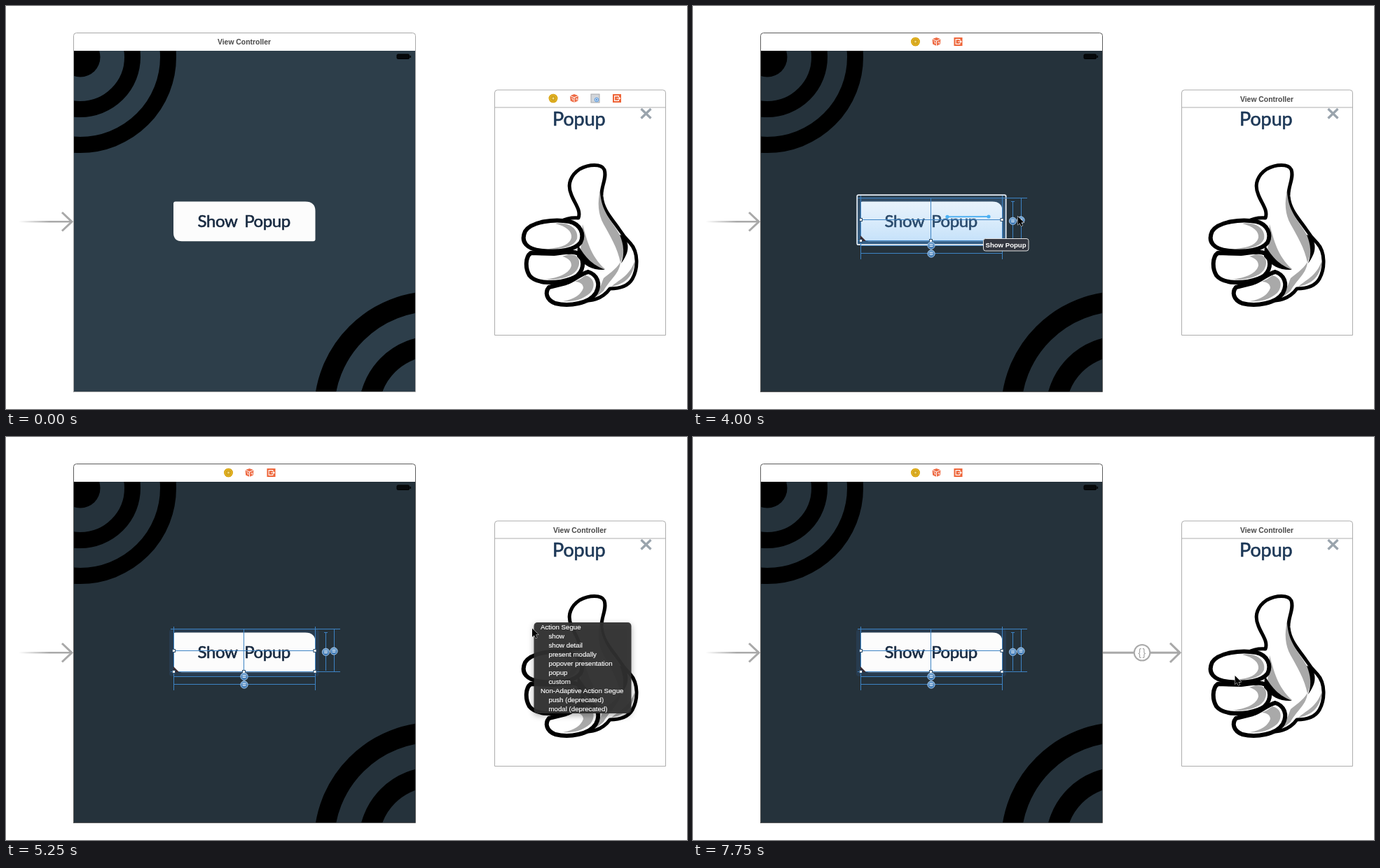
These frames come from a looping animation (972 px wide and 576 px high, 8000 ms). An HTML page:

```html
<!DOCTYPE html>
<html lang="en">
<head>
<meta charset="utf-8">
<title>Storyboard popup segue</title>
<style>
html, body { margin: 0; width: 100%; height: 100%; overflow: hidden; background: #fff; }
svg { display: block; width: 972px; height: 576px; font-family: "Liberation Sans", Arial, sans-serif; }
.title { font-weight: bold; font-size: 10.4px; fill: #484848; text-anchor: middle; }
.hand { font-family: Lato, sans-serif; stroke-width: .6; stroke-linejoin: round; }
.tip { font-weight: bold; font-size: 9.6px; fill: #fff; }
.ink { fill: #fff; stroke: #000; stroke-width: 5; stroke-linejoin: round; }
.finger { stroke-width: 6; }
.shade { fill: #a9a9a9; }
.guide { fill: none; stroke: #3d83c4; stroke-width: 1; }
.arrow { fill: none; stroke: #a9a9a9; stroke-width: 3; }
#menu text { font-size: 9.7px; fill: #fff; stroke: #fff; stroke-width: .15; }
#menu text.on { font-weight: bold; font-size: 9.3px; stroke: none; }
</style>
</head>
<body>
<svg viewBox="0 0 972 576">
  <defs>
    <clipPath id="screen"><rect x="96" y="64" width="488" height="488"/></clipPath>
    <linearGradient id="fadeIn" gradientUnits="userSpaceOnUse" x1="18" y1="0" x2="92" y2="0">
      <stop offset="0" stop-color="#a9a9a9" stop-opacity="0"/>
      <stop offset=".6" stop-color="#a9a9a9"/>
    </linearGradient>
    <linearGradient id="tint" x1="0" y1="0" x2="0" y2="1">
      <stop offset="0" stop-color="#7cc0fa" stop-opacity=".12"/>
      <stop offset="1" stop-color="#4ba6f5" stop-opacity=".33"/>
    </linearGradient>
    <linearGradient id="bead" x1="0" y1="0" x2="0" y2="1">
      <stop offset="0" stop-color="#79a9d6"/>
      <stop offset="1" stop-color="#2f6cab"/>
    </linearGradient>
    <filter id="shadow" x="-20%" y="-20%" width="140%" height="140%">
      <feDropShadow dx="0" dy="3" stdDeviation="4" flood-opacity=".35"/>
    </filter>
    <g id="rings" fill="none" stroke="#000" stroke-width="23">
      <circle r="28.5" fill="#000" stroke="none"/>
      <circle r="74.5"/>
      <circle r="125.5"/>
    </g>
    <g id="owner">
      <circle r="6.3" fill="#f0c22e"/>
      <circle r="5.7" fill="none" stroke="#d3a016" stroke-width="1.2"/>
      <circle r="3.6" fill="none" stroke="#bb8d12" stroke-width=".9"/>
      <rect x="-1.500" y="-1.800" width="3" height="3.600" fill="#fbe48c" stroke="#bb8d12" stroke-width=".8"/>
    </g>
    <g id="cube">
      <path d="M0-6 6-3.7 5.3 3.6 0 6-5.3 3.6-6-3.7Z" fill="#ee6a43"/>
      <path d="M-6-3.6 0-1.2 6-3.6M0-1.2V6" fill="none" stroke="#fff" stroke-width="1"/>
      <path d="M2 1.2 4 .3V3M-4-.3-2 .6V3" fill="none" stroke="#fff" stroke-width=".9"/>
    </g>
    <g id="exit">
      <rect x="-6" y="-6" width="12" height="12" fill="#ee6336"/>
      <path d="M2.4-1.7V-3.4H-3.4V3.4H2.4V1.7M-.6 0H4.5M3-1.5 4.6 0 3 1.5" fill="none" stroke="#fff" stroke-width="1.1"/>
    </g>
    <g id="recognizer">
      <rect x="-6" y="-6" width="12" height="12" fill="#d3d6da" stroke="#a5a8ac"/>
      <circle cx="2" cy="2" r="2.8" fill="#c5def6" stroke="#5a9be0"/>
      <circle cx="2" cy="2" r="1.1" fill="#3b7fd0"/>
    </g>
    <g id="equal">
      <circle r="5.2" fill="url(#bead)" stroke="#a9c8e6" stroke-width=".9"/>
      <path d="M-2.4-1.2H2.4M-2.4 1.3H2.4" stroke="#fff"/>
    </g>
    <rect id="grip" x="-2" y="-2" width="4" height="4" fill="#fff" stroke="#2d4a66"/>
  </defs>

  <path d="M18 308.3H92" fill="none" stroke="url(#fadeIn)" stroke-width="2.4"/>
  <path class="arrow" d="M80 295 94 308.3 80 321.5"/>

  <!-- main scene -->
  <g clip-path="url(#screen)">
    <rect id="backdrop" x="96" y="64" width="488" height="488"/>
    <use href="#rings" transform="translate(106 73)"/>
    <use href="#rings" transform="translate(611 579) scale(1.25)"/>
    <rect x="558" y="69" width="17.5" height="6.5" rx="1.5" fill="#06090b" stroke="#000"/>
    <path d="M577.3 70.8V74" stroke="#000" stroke-width="1.5"/>
  </g>
  <g id="frame" fill="none">
    <path d="M96.5 64V42.5Q96.5 38.5 100.5 38.5H580.5Q584.5 38.5 584.5 42.5V64" fill="#fff"/>
    <path d="M96.5 64V551.5H584.5V64"/>
  </g>
  <rect id="glow" x="233" y="275" width="214" height="67" rx="4" fill="#29415a" opacity=".65"/>
  <path d="M242 279.500H427Q441.500 279.500 441.500 293V333.300Q441.500 336.300 438.500 336.300H251Q239 336.300 239 324V282.500Q239 279.500 242 279.500Z" fill="#fcfcfc"/>
  <text class="hand" x="273.500" y="316" font-size="24" word-spacing="4.500" letter-spacing="-.4" fill="#182a41" stroke="#182a41">Show Popup</text>
  <text id="mainTitle" class="title" x="340" y="55.300">View Controller</text>
  <g id="mainIcons">
    <use href="#owner" x="317.500" y="51"/><use href="#cube" x="347.500" y="51"/><use href="#exit" x="378.500" y="51"/>
  </g>
  <g id="buttonTint">
    <rect x="234" y="270" width="213" height="71.500" rx="2" fill="url(#tint)"/>
    <rect x="234.200" y="270.200" width="212.500" height="71" rx="2" fill="none" stroke="#e7eef5" stroke-width="1.700"/>
  </g>
  <g id="guides">
    <path class="guide" d="M235 274.500H477M235 335.500H477M239.500 271V362M441.500 271V362M239 305.500H441M339.500 275V354M456.500 280V334M468.500 275V335M454 279.500H459M239 342.500H441M239 353.500H441"/>
    <path d="M239 328V336H247Z" fill="#3a2b30"/>
    <use href="#grip" x="239.500" y="305.500"/><use href="#grip" x="441" y="305.500"/>
    <use href="#grip" x="339.500" y="335.500"/><use href="#grip" x="239.500" y="335.500"/><use href="#grip" x="441" y="335.500"/>
    <use href="#equal" x="456.500" y="307.300"/><use href="#equal" x="468" y="306"/>
    <use href="#equal" x="340" y="342.300"/><use href="#equal" x="340" y="354"/>
  </g>

  <!-- popup scene -->
  <path d="M697.500 470.500V124Q697.500 120 701.500 120H937.500Q941.500 120 941.500 124V470.500ZM697.500 145H941.500" fill="#fff" stroke="#adadad"/>
  <text id="popTitle" class="title" x="819" y="136.600">View Controller</text>
  <g id="popIcons">
    <use href="#owner" x="781" y="132"/><use href="#cube" x="811" y="132"/>
    <use href="#recognizer" x="841" y="132"/><use href="#exit" x="872" y="132"/>
  </g>
  <text class="hand" x="780" y="170.500" font-size="27" letter-spacing="-.1" fill="#1d3857" stroke="#1d3857">Popup</text>
  <path d="M906.500 147 920.500 160.500M920.500 147 906.500 160.500" stroke="#9aa4ad" stroke-width="3.300"/>

  <g id="thumb">
    <path class="ink" d="M817 303C821 292 812 283 807 270C800 254 807 241 819 233C832 226 850 225 854 234C858 246 849 258 850 272C852 293 866 305 875 319C880 327 885 333 891 339C903 352 902 376 894 390C887 402 874 404 862 404C851 419 836 423 812 421L780 385 775 325Q790 301 817 303Z"/>
    <path class="shade" d="M848 264C849 294 865 307 876 327C883 341 883 354 877 367C873 346 862 328 853 312C845 298 844 280 848 264Z"/>
    <path class="shade" d="M823 312C829 334 834 357 855 376L847 377C833 371 823 361 820 350Z"/>
    <path class="shade" d="M898 362C896 386 885 397 864 401C877 390 892 384 898 362ZM877 366C876 382 862 391 853 407C841 418 833 420 826 420C848 412 849 398 853 389C860 383 870 377 877 366Z"/>
    <path d="M883 329C891 344 888 354 878 368C883 354 882 342 876 327Z"/>
    <path class="ink finger" d="M775 402C769 409 771 420 784 425C804 430 833 425 842 410C849 397 844 384 831 380C819 383 812 392 799 396Z"/>
    <path class="shade" d="M827 385C840 388 842 401 834 410C823 420 809 423 795 422C812 419 821 412 824 403C824 397 818 394 812 394Q820 391 827 385Z"/>
    <path class="ink finger" d="M749 353C741 359 741 375 747 385C757 398 787 397 806 390C822 385 827 370 820 357C815 349 800 352 782 354Z"/>
    <path class="shade" d="M803 355C819 354 821 367 815 377C807 388 789 392 769 391C791 388 804 382 807 371C807 364 802 360 794 358Z"/>
    <path class="ink finger" d="M741 322C750 308 782 304 804 308C820 312 826 326 820 338C812 349 790 352 766 350C743 348 734 337 741 322Z"/>
    <path class="shade" d="M784 311C805 308 818 320 815 333C810 344 795 348 775 347C795 345 805 340 807 331C808 322 800 315 784 311Z"/>
    <path d="M816 341C828 361 836 369 855 377C838 378 826 372 815 358Z"/>
  </g>

  <g id="popTint">
    <rect x="693" y="140.500" width="252.500" height="334.500" rx="2" fill="url(#tint)"/>
    <path d="M693 140.500H945.500V475H693ZM697.500 145V470.500H941.500V145" fill="none" stroke="#8fbbe2"/>
  </g>
  <g id="buttonTip">
    <rect x="414.500" y="332.500" width="64.500" height="17.500" rx="3" fill="#343740" stroke="#e2e2e2"/>
    <text class="tip" x="417.500" y="344.800">Show Popup</text>
  </g>
  <g id="popTip">
    <rect x="907.500" y="467.500" width="80" height="17.500" rx="3" fill="#4a4a4a" stroke="#c6c6c6"/>
    <text class="tip" x="910.800" y="479.300">View Controller</text>
  </g>

  <g id="segue">
    <path class="arrow" d="M585 308.300H694M681 294.700 695 308.300 681 322"/>
    <circle cx="641" cy="308.300" r="11.300" fill="#fff" stroke="#a9a9a9" stroke-width="2"/>
    <text x="641.500" y="313" text-anchor="middle" font-size="14" letter-spacing="1.500" fill="#a0a0a0">{}</text>
  </g>

  <g id="drag" stroke-linecap="round">
    <path id="dragEdge" stroke="#d5ecfd" stroke-opacity=".6" stroke-width="3.300"/>
    <path id="dragLine" stroke="#55b3f2" stroke-width="2"/>
    <circle cx="363" cy="301.300" r="2.600" fill="#4cb1f4"/>
    <circle id="dragEnd" fill="#4cb1f4"/>
  </g>

  <g id="menu">
    <rect x="753.500" y="265" width="139" height="130" rx="5" fill="#303030" fill-opacity=".94" filter="url(#shadow)"/>
    <rect id="pick" x="753.500" width="139" height="13" fill="#141414"/>
  </g>
  <path id="cursor" d="M0 0V12.400L2.900 9.800 4.900 14.200 7 13.300 5.100 9H9Z" stroke="#fff" stroke-width="1" paint-order="stroke"/>
</svg>
<script>
const LOOP = 8000;
const $ = id => document.getElementById(id);
const items = ["Action Segue", "show", "show detail", "present modally", "popover presentation",
  "popup", "custom", "Non-Adaptive Action Segue", "push (deprecated)", "modal (deprecated)"];

const rows = items.map((label, i) => {
  const row = document.createElementNS("http://www.w3.org/2000/svg", "text");
  row.textContent = label;
  row.setAttribute("x", i % 7 ? 774.5 : 763);
  row.setAttribute("y", 275 + 13 * i);
  $("menu").append(row);
  return row;
});

// Each step holds until the next one: [start ms, value]
const cursor = [[0, null], [250, [653.5, 114]], [500, [379.5, 301.5]], [750, [363.5, 312]], [1000, [359.5, 314]],
  [2000, [360.5, 313]], [2250, [358.5, 302.5]], [3750, null], [4000, [463.5, 300.5]], [4250, [582, 321]],
  [4500, [714.5, 307]], [4750, [751, 273.5]], [5750, [757, 290]], [6000, [764, 319]], [6250, [773.5, 341]]];
const drag = [[0, null], [3750, [422, 301]], [4250, [582, 320]], [4500, [714, 306]], [4750, [750, 275]], [5250, null]];
const picked = [[0, -1], [5750, 1], [6000, 3], [6250, 5], [7000, -1]];
const menuFade = [[0, 0], [5250, 1], [7250, .45], [7500, 0]];

// Layers shown between two times
const spans = {
  mainTitle: [0, 2750], popIcons: [0, 2750],
  mainIcons: [2750, LOOP], popTitle: [2750, LOOP], glow: [2750, LOOP], guides: [2750, LOOP],
  buttonTint: [4000, 4250], buttonTip: [4000, 4250],
  popTint: [4750, 5250], popTip: [4750, 5250], segue: [7750, LOOP]
};

const at = (steps, t) => steps.findLast(step => step[0] <= t)[1];
const show = (id, on) => { $(id).style.display = on ? "" : "none"; };

function draw(t) {
  for (const id in spans) show(id, t >= spans[id][0] && t < spans[id][1]);

  const selected = t >= 2750;
  $("backdrop").setAttribute("fill", selected ? "#25323b" : "#2d3e4a");
  $("frame").setAttribute("stroke", selected ? "#5c5c5c" : "#a8a8a8");

  const tip = at(cursor, t);
  show("cursor", tip);
  if (tip) $("cursor").setAttribute("transform", `translate(${tip})`);

  const end = at(drag, t);
  show("drag", end);
  if (end) {
    const dropped = t >= 5000;
    for (const id of ["dragEdge", "dragLine"]) $(id).setAttribute("d", `M363 301.3L${end}`);
    show("dragEdge", t >= 4250);
    $("dragEnd").setAttribute("cx", end[0]);
    $("dragEnd").setAttribute("cy", end[1]);
    $("dragEnd").setAttribute("r", dropped ? 6 : 2.6);
    $("drag").setAttribute("opacity", dropped ? .6 : 1);
  }

  const fade = at(menuFade, t);
  show("menu", fade);
  $("menu").setAttribute("opacity", fade);
  const n = at(picked, t);
  show("pick", n >= 0);
  $("pick").setAttribute("y", 265 + 13 * n);
  rows.forEach((row, i) => row.classList.toggle("on", i === n));
}

function tick() {
  draw(performance.now() % LOOP);
  requestAnimationFrame(tick);
}
tick();
</script>
</body>
</html>
```
